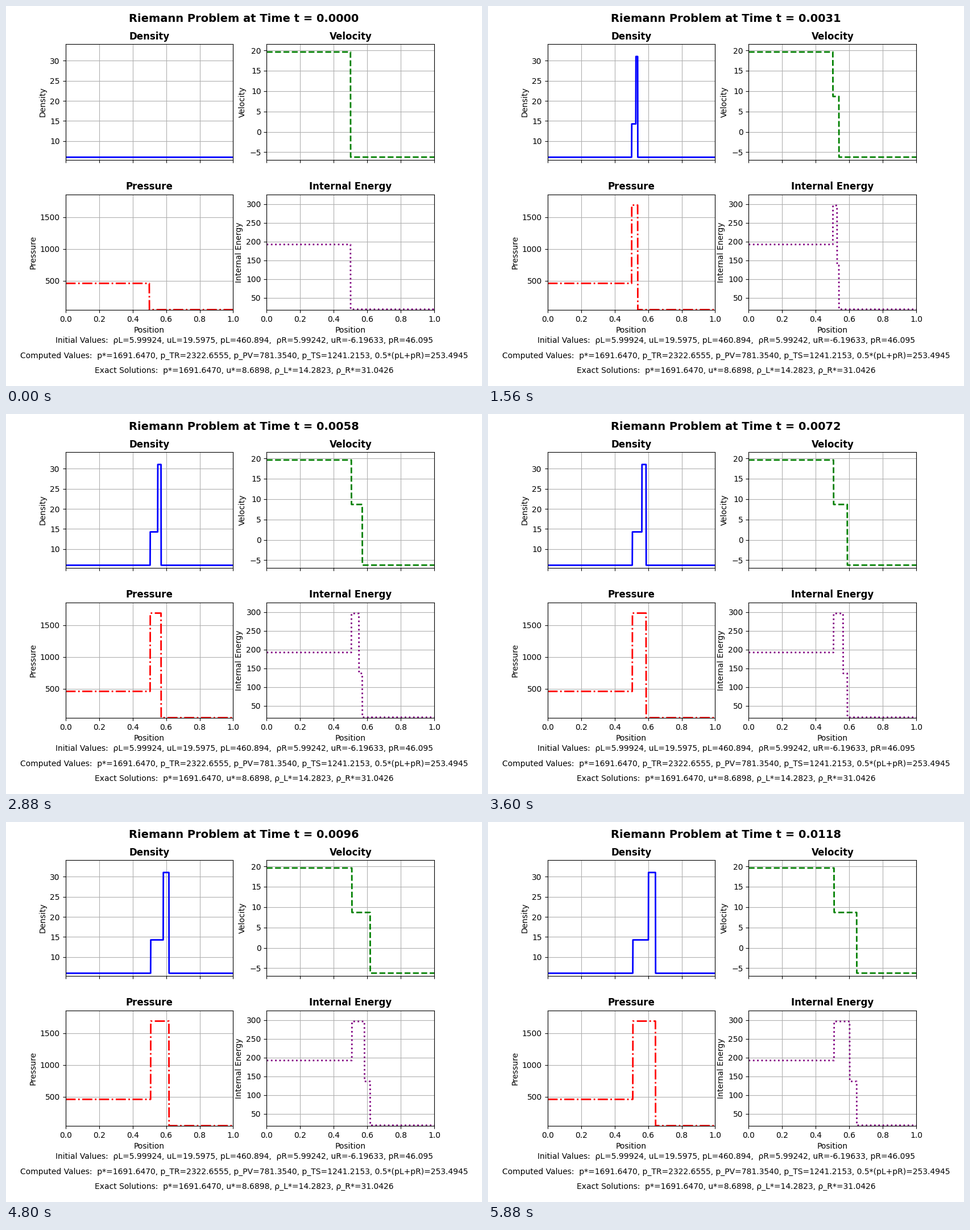
Write a matplotlib script that moves like this. It is 837x669 px and loops after 6 s.

```python
import numpy as np
import matplotlib.pyplot as plt
from matplotlib.animation import FuncAnimation

FRAMES, INTERVAL = 50, 120
DT = 0.00024
GAMMA = 1.4
X0 = 0.5

# Left and right states, and the star region between the two shocks
RHO_L, U_L, P_L = 5.99924, 19.5975, 460.894
RHO_R, U_R, P_R = 5.99242, -6.19633, 46.095
P_STAR, U_STAR = 1691.6470, 8.6898
RHO_L_STAR, RHO_R_STAR = 14.2823, 31.0426


def shock_speed(rho, u, rho_star):
    """Mass conservation across a shock."""
    return (rho_star * U_STAR - rho * u) / (rho_star - rho)


WAVES = np.array([shock_speed(RHO_L, U_L, RHO_L_STAR), U_STAR,
                  shock_speed(RHO_R, U_R, RHO_R_STAR)])

# Values in the four regions, from left to right
density = np.array([RHO_L, RHO_L_STAR, RHO_R_STAR, RHO_R])
velocity = np.array([U_L, U_STAR, U_STAR, U_R])
pressure = np.array([P_L, P_STAR, P_STAR, P_R])
energy = pressure / ((GAMMA - 1) * density)

PANELS = [
    ("Density", density, "blue", "-"),
    ("Velocity", velocity, "green", "--"),
    ("Pressure", pressure, "red", "-."),
    ("Internal Energy", energy, "purple", ":"),
]

NOTES = [
    (0.12, f"Initial Values:  ρL={RHO_L}, uL={U_L}, pL={P_L},  "
           f"ρR={RHO_R}, uR={U_R}, pR={P_R}"),
    (0.08, f"Computed Values:  p*={P_STAR:.4f}, p_TR=2322.6555, "
           f"p_PV=781.3540, p_TS=1241.2153, 0.5*(pL+pR)=253.4945"),
    (0.04, f"Exact Solutions:  p*={P_STAR:.4f}, u*={U_STAR}, "
           f"ρ_L*={RHO_L_STAR}, ρ_R*={RHO_R_STAR}"),
]

x = np.linspace(0, 1, 1000)

plt.rcParams["font.family"] = "DejaVu Sans"
# The small margin keeps the pixel size from being rounded down
fig, axes = plt.subplots(2, 2, figsize=(8.37001, 6.69001), dpi=100,
                         sharex=True)
fig.subplots_adjust(left=0.125, right=0.9, bottom=0.2, top=0.9,
                    wspace=0.2, hspace=0.3)
heading = fig.suptitle("", fontsize=14, fontweight="bold")

lines = []
for ax, (name, values, color, style) in zip(axes.flat, PANELS):
    low, high = values.min(), values.max()
    ax.set_xlim(0, 1)
    ax.set_ylim(low * (0.9 if low > 0 else 1.1), high * 1.1)
    ax.set_title(name, fontsize=12, fontweight="bold")
    ax.set_ylabel(name)
    ax.grid(True)
    lines += ax.plot([], [], color=color, linestyle=style, linewidth=2)
for ax in axes[1]:
    ax.set_xlabel("Position")

for y, note in NOTES:
    fig.text(0.5, y, note, ha="center", va="center", fontsize=10)


def update(frame):
    t = frame * DT
    region = np.searchsorted(X0 + WAVES * t, x)
    for line, (_, values, _, _) in zip(lines, PANELS):
        line.set_data(x, values[region])
    heading.set_text(f"Riemann Problem at Time t = {t:.4f}")
    return [*lines, heading]


anim = FuncAnimation(fig, update, frames=FRAMES, interval=INTERVAL,
                     repeat=True, repeat_delay=0)
plt.show()
```
